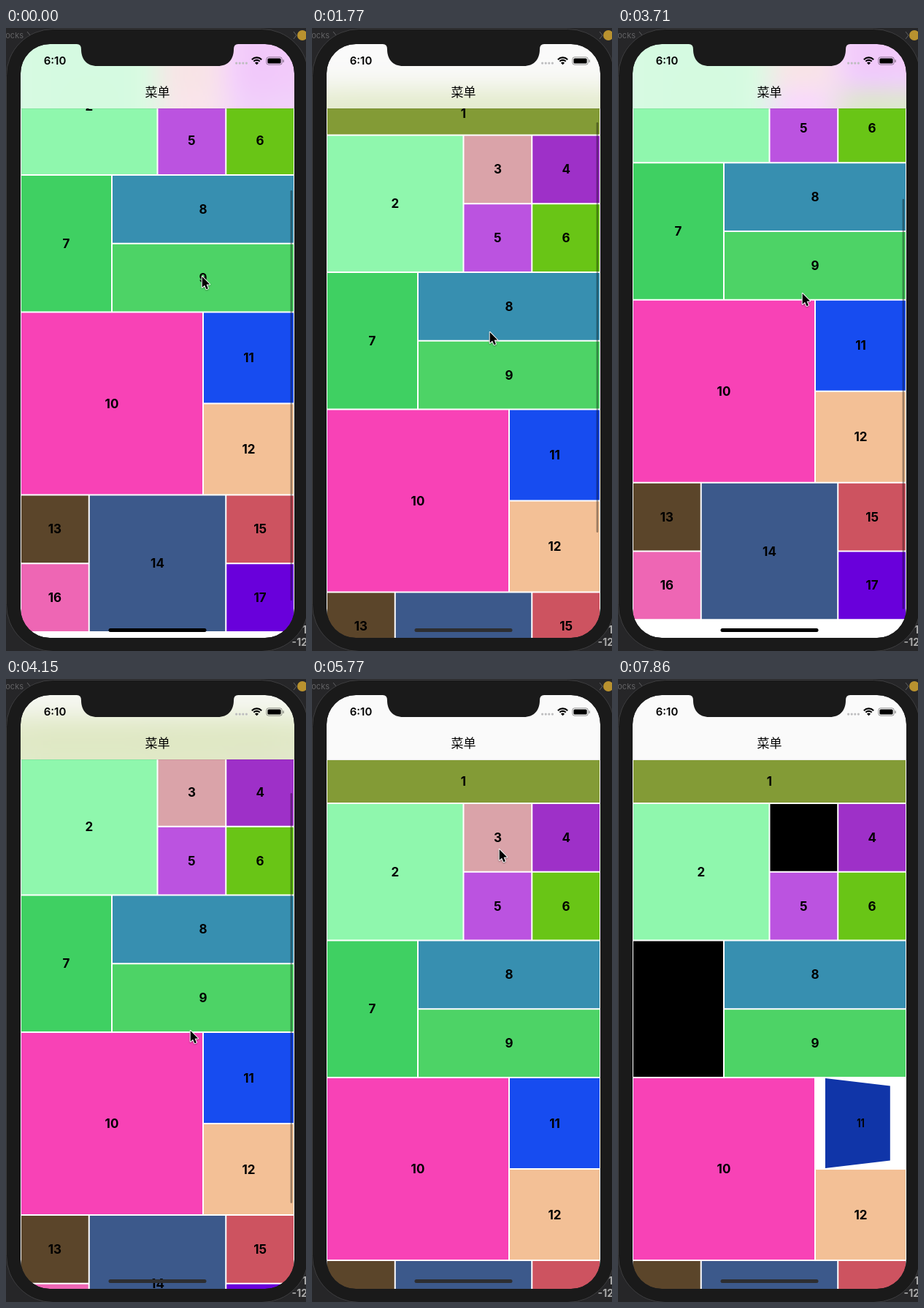
These frames come from a looping animation (411x852 px, 8 s). An HTML page with a canvas:

```html
<!DOCTYPE html>
<html lang="zh">
<head>
<meta charset="utf-8">
<title>菜单</title>
<style>
html, body { margin: 0; width: 100%; height: 100%; overflow: hidden; background: #262628; }
canvas { display: block; }
</style>
</head>
<body>
<canvas id="stage" width="411" height="852"></canvas>
<script>
const LOOP = 8000, TICKS = 54, LEAD = 10;
const UNIT = 375 / 12;
const SCREEN = { x: 20, y: 22, w: 375, h: 812, r: 40 };
const BAR = { x: 20, y: 22, w: 375, h: 88 };
const BEZEL = '#1a1a1a';
const UI = 'Inter, "Open Sans", sans-serif';

const ctx = document.getElementById('stage').getContext('2d');
const PAD = 60;
const bar = document.createElement('canvas');
bar.width = BAR.w + PAD * 2;
bar.height = BAR.h + PAD * 2;
const barCtx = bar.getContext('2d');

// column, row, width, height in twelfths of the screen width, then RGB
const cells = [
  [0, -1.92, 12, 1.92, '839b36'],
  [0, 0, 6, 6, '8ff7ad'], [6, 0, 3, 3, 'daa3a9'], [9, 0, 3, 3, '9e30c8'],
  [6, 3, 3, 3, 'bb53e0'], [9, 3, 3, 3, '69c516'],
  [0, 6, 4, 6, '3fd062'], [4, 6, 8, 3, '378fb0'], [4, 9, 8, 3, '4dd366'],
  [0, 12, 8, 8, 'f842b6'], [8, 12, 4, 4, '174cf0'], [8, 16, 4, 4, 'f3c096'],
  [0, 20, 3, 3, '5b452a'], [3, 20, 6, 6, '3c598b'], [9, 20, 3, 3, 'cd5360'],
  [0, 23, 3, 3, 'ee66b4'], [9, 23, 3, 3, '6900db']
].map(([c, r, w, h, hex], i) => ({
  label: String(i + 1),
  cx: 20 + (c + w / 2) * UNIT,
  cy: 170 + (r + h / 2) * UNIT,
  w: w * UNIT - 2,
  h: h * UNIT - 2,
  rgb: [0, 2, 4].map(k => parseInt(hex.slice(k, k + 2), 16))
}));

// Motion keys: [tick, value...]
const scrollKeys = [
  [0, 156.5], [1, 115], [2, 55], [3, 5], [4, -20], [5, -11], [6, -5], [7, -2], [8, 0],
  [11, 0], [12, 23.5], [13, 95], [14, 150], [15, 174], [16, 181], [17, 182.5],
  [24.6, 182.5], [26, 150], [28, 62], [29, 15], [30, -27], [31, -17], [32, -9],
  [33, -5], [34, -2.5], [35, -1.3], [38, 0]
];
const cursorKeys = [
  [0, 268, 339], [3, 258, 491], [4, 254, 535], [6, 249, 552], [8, 246, 557], [9, 243, 547],
  [10, 243, 547], [12, 243, 415], [13, 248, 352], [14, 252, 336], [23, 252, 336],
  [25, 252, 362], [28, 252, 480], [30, 248, 580], [33, 234, 532], [36, 242, 340],
  [39, 256, 232], [41, 256, 232], [44, 111, 465], [46, 111, 465],
  [48, 288, 602], [49, 322, 612]
];
const barKeys = [
  [0, 1], [5, 1], [8, 0], [11, 0], [12, 1], [14, 1], [17, 0],
  [24, 0], [25, 1], [35, 1], [38, 0]
];
const flipStart = { 3: 40.16, 7: 44.07, 11: 50.78 };
const FLIP_TICKS = 6, CURSOR_END = 52;

function at(keys, t) {
  const i = keys.findIndex(k => k[0] > t);
  if (i < 0) return keys[keys.length - 1].slice(1);
  const a = keys[i - 1], b = keys[i], p = (t - a[0]) / (b[0] - a[0]);
  return a.slice(1).map((v, n) => v + (b[n + 1] - v) * p);
}

function text(str, x, y, font, color = '#000', align = 'center') {
  ctx.font = font;
  ctx.fillStyle = color;
  ctx.textAlign = align;
  ctx.fillText(str, x, y);
}

function pill(x, y, w, h, r, color) {
  ctx.beginPath();
  ctx.roundRect(x, y, w, h, r);
  ctx.fillStyle = color;
  ctx.fill();
}

function poly(points) {
  ctx.beginPath();
  points.forEach(([x, y]) => ctx.lineTo(x, y));
  ctx.closePath();
}

function drawCell(cell, offset, tick) {
  const start = flipStart[cell.label];
  const p = start ? Math.min(1, Math.max(0, (tick - start) / FLIP_TICKS)) : 0;
  const fade = (1 - Math.cos(Math.PI * p)) / 2;
  const angle = Math.PI * Math.pow(fade, 1.3);
  const cos = Math.abs(Math.cos(angle)), sin = Math.sin(angle);
  const far = angle < Math.PI / 2 ? 1 : -1;
  const depth = 3 * Math.max(cell.w, cell.h);
  const hw = cell.w / 2, hh = cell.h / 2;
  const scale = x => 1 / (1 + (hw + far * x) * sin / depth);
  const corner = (x, y) => [x * cos * scale(x), y * scale(x)];

  ctx.save();
  ctx.translate(cell.cx, cell.cy - offset);
  ctx.fillStyle = `rgb(${cell.rgb.map(v => Math.round(v * (1 - fade))).join()})`;
  poly([corner(-hw, -hh), corner(hw, -hh), corner(hw, hh), corner(-hw, hh)]);
  ctx.fill();
  ctx.scale(cos * scale(0), scale(0));
  text(cell.label, 0, 6, '700 17px ' + UI);
  ctx.restore();
}

// Frosted bar: mirror the strip at its edges, then blur and lighten it
function drawBar() {
  for (let i = -1; i <= 1; i++) {
    for (let j = -1; j <= 1; j++) {
      barCtx.setTransform(i ? -1 : 1, 0, 0, j ? -1 : 1,
        PAD + (i + (i ? 1 : 0)) * BAR.w, PAD + (j + (j ? 1 : 0)) * BAR.h);
      barCtx.drawImage(ctx.canvas, BAR.x, BAR.y, BAR.w, BAR.h, 0, 0, BAR.w, BAR.h);
    }
  }
  ctx.save();
  ctx.beginPath();
  ctx.rect(BAR.x, BAR.y, BAR.w, BAR.h);
  ctx.clip();
  ctx.filter = 'blur(20px) saturate(1.8)';
  ctx.drawImage(bar, BAR.x - PAD, BAR.y - PAD);
  ctx.filter = 'none';
  ctx.fillStyle = 'rgba(249,249,249,0.79)';
  ctx.fillRect(BAR.x, BAR.y, BAR.w, BAR.h);
  ctx.restore();
  ctx.fillStyle = 'rgba(0,0,0,0.1)';
  ctx.fillRect(BAR.x, BAR.y + BAR.h, BAR.w, 0.7);
}

function drawIndicator(offset, alpha) {
  const over = Math.max(0, -offset);
  const y = 112.5 + Math.max(0, offset) * 0.7;
  ctx.globalAlpha = alpha;
  pill(389.6, y, 2.6, 561 - over * 0.8, 1.3, 'rgba(0,0,0,0.37)');
  ctx.globalAlpha = 1;
}

function drawPhone() {
  const hole = () => ctx.roundRect(SCREEN.x, SCREEN.y, SCREEN.w, SCREEN.h, SCREEN.r);

  // desktop behind the phone
  ctx.beginPath();
  ctx.rect(0, 0, 411, 852);
  hole();
  ctx.fillStyle = '#262628';
  ctx.fill('evenodd');
  text('Blocks', 24, 14, '11px ' + UI, '#626264', 'right');
  ctx.strokeStyle = '#626264';
  ctx.lineWidth = 1;
  for (const x of [29, 394]) {
    ctx.beginPath();
    ctx.moveTo(x, 5);
    ctx.lineTo(x + 4, 10);
    ctx.lineTo(x, 15);
    ctx.stroke();
  }
  pill(399, 3, 14, 14, 7, '#b9922f');
  text('1', 412, 828, '700 14px ' + UI, '#a9a9a9', 'right');
  text('-12', 413, 845, '700 14px ' + UI, '#a9a9a9', 'right');

  ctx.beginPath();
  ctx.roundRect(0.5, 1.5, 414, 851, 64);
  hole();
  ctx.fillStyle = BEZEL;
  ctx.fill('evenodd');
  ctx.beginPath();
  ctx.roundRect(0.5, 1.5, 414, 851, 64);
  ctx.strokeStyle = '#3d3d3f';
  ctx.stroke();

  // notch
  ctx.beginPath();
  ctx.moveTo(97, 21);
  ctx.lineTo(97, 22);
  ctx.quadraticCurveTo(103, 22, 103, 29);
  ctx.bezierCurveTo(103, 43, 111, 52, 125, 52);
  ctx.lineTo(290, 52);
  ctx.bezierCurveTo(304, 52, 312, 43, 312, 29);
  ctx.quadraticCurveTo(312, 22, 318, 22);
  ctx.lineTo(318, 21);
  ctx.fillStyle = BEZEL;
  ctx.fill();
}

function drawStatus() {
  text('6:10', 67, 50.3, '600 15px ' + UI);
  for (let i = 0; i < 4; i++) pill(314 + i * 4.6, 46.5, 3.2, 3.2, 1.6, '#bdbdbf');

  ctx.strokeStyle = '#000';
  ctx.lineWidth = 2.1;
  for (const r of [5.9, 9.4]) {
    ctx.beginPath();
    ctx.arc(343.5, 49.8, r, -Math.PI * 0.75, -Math.PI * 0.25);
    ctx.stroke();
  }
  ctx.beginPath();
  ctx.moveTo(343.5, 50.3);
  ctx.arc(343.5, 50.3, 3.6, -Math.PI * 0.75, -Math.PI * 0.25);
  ctx.fillStyle = '#000';
  ctx.fill();

  ctx.beginPath();
  ctx.roundRect(356.8, 39.8, 21.4, 10.4, 3);
  ctx.strokeStyle = 'rgba(0,0,0,0.4)';
  ctx.lineWidth = 1;
  ctx.stroke();
  pill(358.4, 41.4, 18.2, 7.2, 1.6, '#000');
  pill(379.4, 43.2, 1.3, 3.8, 0.6, 'rgba(0,0,0,0.45)');

  text('菜单', 207.5, 94.3, '500 17px "Noto Sans CJK SC", "Noto Sans CJK", sans-serif');
}

function drawCursor(x, y) {
  ctx.save();
  ctx.translate(x + 0.7, y + 1);
  poly([[0, 0], [0, 14.8], [3.4, 11.7], [5.8, 17.2], [8.2, 16.2], [5.9, 10.8], [10.4, 10.6]]);
  ctx.lineJoin = 'round';
  ctx.lineWidth = 2;
  ctx.strokeStyle = '#fff';
  ctx.shadowColor = 'rgba(0,0,0,0.35)';
  ctx.shadowBlur = 2;
  ctx.shadowOffsetY = 1;
  ctx.stroke();
  ctx.shadowColor = 'transparent';
  ctx.fillStyle = '#000';
  ctx.fill();
  ctx.restore();
}

function draw(ms) {
  const tick = Math.min(TICKS - 1, Math.floor((ms % LOOP + LEAD) * TICKS / LOOP));
  const [offset] = at(scrollKeys, tick);
  const [alpha] = at(barKeys, tick);

  ctx.fillStyle = '#fff';
  ctx.fillRect(0, 0, 411, 852);
  cells.forEach(cell => drawCell(cell, offset, tick));
  drawIndicator(offset, alpha);
  drawBar();
  drawPhone();
  drawStatus();
  pill(140.5, 821, 134, 5, 2.5, offset > 140 ? '#000' : '#2d2e31');
  if (tick < CURSOR_END) drawCursor(...at(cursorKeys, tick));
}

let origin;
function frame(now) {
  origin ??= now;
  draw(now - origin);
  requestAnimationFrame(frame);
}
requestAnimationFrame(frame);
</script>
</body>
</html>
```
